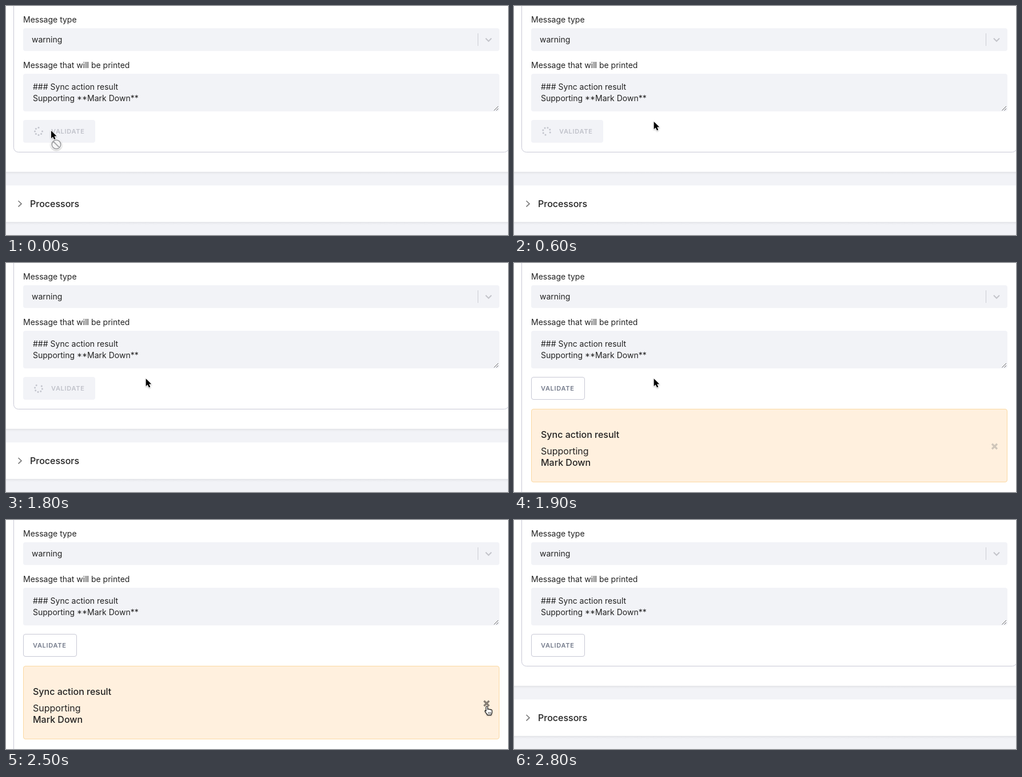
Animation, 878 px wide and 402 px high, one loop 3.35 s. Source, as an HTML page:

```html
<!DOCTYPE html>
<html lang="en">
<head>
<meta charset="utf-8">
<title>Validate a message</title>
<style>
  html, body { margin: 0; width: 100%; height: 100%; overflow: hidden; background: #fff; }
  svg { display: block; }
  text { font: 14px Inter, sans-serif; fill: #222; }
  .large { font-size: 16px; }
  .medium { font-weight: 500; }
  .button { font-size: 11px; font-weight: 600; letter-spacing: .7px; fill: #747b8b; }
  .field { fill: #f2f3f7; }
  .line { fill: none; stroke: #c7c8d5; }
  .icon { fill: none; stroke: #c3c4ca; stroke-width: 2; }
</style>
</head>
<body>
<svg width="878" height="402" viewBox="0 0 878 402">
  <defs>
    <linearGradient id="shade" x2="0" y2="1">
      <stop stop-color="#e3e4e8"/>
      <stop offset="1" stop-color="#f2f3f7"/>
    </linearGradient>
    <filter id="soft" x="-50%" y="-50%" width="200%" height="200%">
      <feDropShadow dx="0" dy="1" stdDeviation="1" flood-opacity=".35"/>
    </filter>
  </defs>
  <rect width="878" height="402" fill="#fff"/>

  <g id="closed">
    <rect class="line" x="13.5" y="-20" width="866" height="276.5" rx="8"/>
    <rect class="field" y="291" width="878" height="24"/>
    <rect y="291" width="878" height="5" fill="url(#shade)"/>
    <rect class="field" y="379" width="878" height="23"/>
    <rect y="379" width="878" height="5" fill="url(#shade)"/>
    <path d="M21.5 342l5.5 5.2-5.5 5.2" fill="none" stroke="#777" stroke-width="1.6"/>
    <text class="large medium" x="42" y="353">Processors</text>
  </g>

  <g id="alert">
    <path class="line" d="M13.5 0V402"/>
    <rect x="30.5" y="256.5" width="832" height="128" rx="3.5" fill="#fff0de" stroke="#fbd9a2"/>
    <text class="large medium" x="47" y="307">Sync action result</text>
    <text class="large" x="47" y="336">Supporting</text>
    <text class="large medium" x="47" y="356">Mark Down</text>
    <path id="close" d="M836 317.5l9 9m0-9l-9 9" stroke-width="3.2"/>
  </g>

  <text x="30" y="29">Message type</text>
  <rect class="field" x="30" y="39" width="833" height="40" rx="4"/>
  <text x="45" y="64">warning</text>
  <path d="M825.5 48V70" stroke="#cccdd2"/>
  <path class="icon" d="M839 56.8l5 5 5-5"/>

  <text x="30" y="109">Message that will be printed</text>
  <rect class="field" x="30" y="119" width="833" height="66" rx="4"/>
  <text x="47" y="147">### Sync action result</text>
  <text x="47" y="167">Supporting **Mark Down**</text>
  <path d="M853.5 183.5l7.5-7.5m-3.5 7.5l3.5-3.5" stroke="#666"/>

  <g id="busy">
    <rect class="field" x="30" y="200" width="126" height="40" rx="4"/>
    <g id="spinner" fill="#c3c5cd"></g>
    <text class="button" x="79" y="224" style="fill:#c0c2ca">VALIDATE</text>
  </g>
  <g id="ready">
    <rect class="line" x="30.5" y="200.5" width="93" height="39" rx="3.5"/>
    <text class="button" x="47" y="224">VALIDATE</text>
  </g>

  <g id="arrow" filter="url(#soft)">
    <path d="M0 0V13.2L3 10.4 5.3 15.6 7.6 14.6 5.4 9.6H9.6Z" stroke="#fff" stroke-width="1.2" paint-order="stroke"/>
    <g id="blocked" fill="none">
      <circle cx="9" cy="24" r="7.8" fill="#fff" fill-opacity=".7" stroke="#fff" stroke-width="4"/>
      <path d="M3.6 18.6L14.4 29.4M16.8 24a7.8 7.8 0 1 1-15.6 0a7.8 7.8 0 1 1 15.6 0" stroke="#a5a6a9" stroke-width="2"/>
    </g>
  </g>
  <g id="hand" filter="url(#soft)">
    <path d="M839.7 335.5V328.5c0-2 2.8-2 2.8 0v4.2c.3-1.3 2.5-1.2 2.7.2.4-1.1 2.3-.8 2.5.5.5-.9 2.3-.5 2.3 1v3.3c0 1.7-1.2 2.6-1.5 4.7h-6.6c-.5-2.2-2.5-3.7-3.9-6.2-.9-1.6.5-2.7 1.7-.7Z"
      fill="#fff" stroke="#111" stroke-width="1.1" stroke-linejoin="round"/>
    <path d="M843.6 337.3v3m2 -3v3m2-3v3" stroke="#111" stroke-width=".8"/>
  </g>
</svg>
<script>
  const LOOP = 3350, STEP = 100;
  const DONE = 1900, ON_CLOSE = 2300, DISMISSED = 2600, POINTER_GONE = 2800;
  const START = [79, 219], REST = [244.7, 203], CLOSE = [842, 327];
  const get = id => document.getElementById(id);
  const show = (id, on) => get(id).style.display = on ? '' : 'none';

  // Seven dots on a ring of eight; the upper right one is absent.
  for (let i = 0; i < 8; i++) {
    if (i === 7) continue;
    const a = i * Math.PI / 4;
    get('spinner').innerHTML +=
      `<circle cx="${6.5 * Math.cos(a)}" cy="${6.5 * Math.sin(a)}" r="1.5"/>`;
  }

  function glide(from, to, progress) {
    const p = Math.min(1, Math.max(0, progress));
    const eased = p * p * (3 - 2 * p);
    return from.map((v, i) => v + (to[i] - v) * eased);
  }

  function draw(time) {
    const t = Math.floor(time % LOOP / STEP) * STEP;
    const alertOpen = t >= DONE && t < DISMISSED;
    const onClose = t >= ON_CLOSE;
    show('alert', alertOpen);
    show('closed', !alertOpen);
    show('busy', t < DONE);
    show('ready', t >= DONE);
    show('arrow', !onClose);
    show('hand', onClose && t < POINTER_GONE);

    const [x, y] = t < DONE
      ? glide(START, REST, t / 500)
      : glide(REST, CLOSE, (t - DONE) / (ON_CLOSE - DONE));
    get('arrow').setAttribute('transform', `translate(${x} ${y})`);
    show('blocked', x < 156);
    get('spinner').setAttribute('transform', `translate(57 220) rotate(${t * 0.18})`);
    get('close').setAttribute('stroke', onClose ? '#857d73' : '#cfc6ba');
  }

  const begin = performance.now();
  function tick() {
    draw(performance.now() - begin);
    requestAnimationFrame(tick);
  }
  tick();
</script>
</body>
</html>
```
